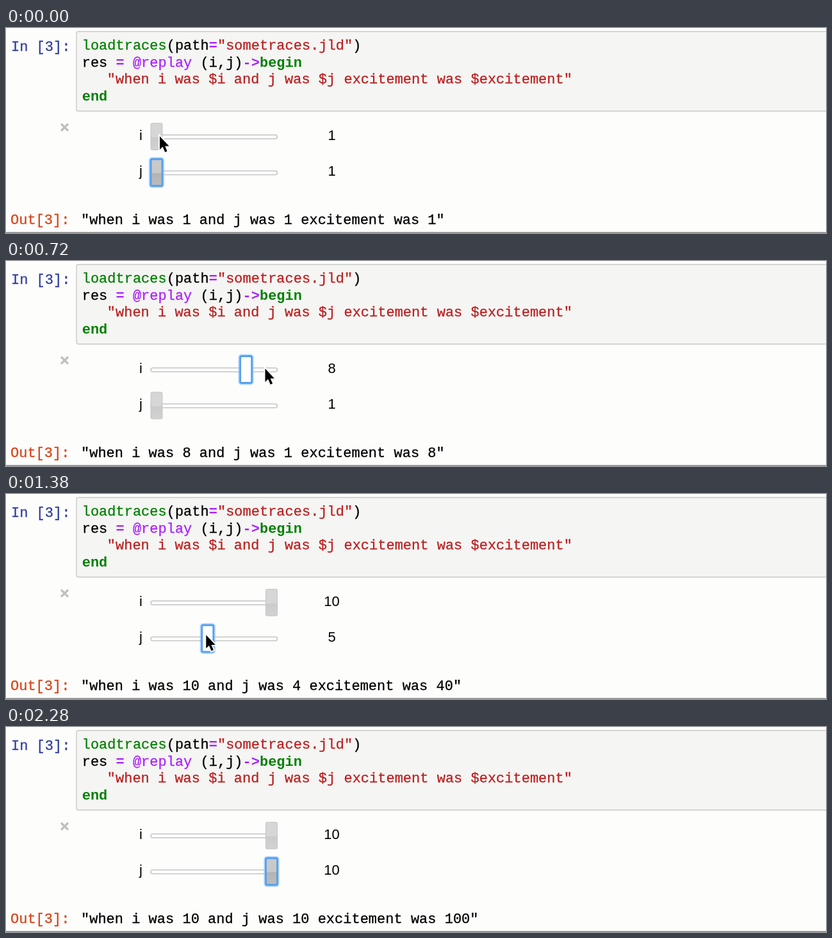
An HTML page that plays this animation: 1280x322 px, repeating every 2.31 s.

```html
<!DOCTYPE html>
<html lang="en">
<head>
<meta charset="utf-8">
<title>Slider replay</title>
<style>
  html, body { margin: 0; width: 100%; height: 100%; overflow: hidden; background: #fdfdfc; }
  svg { display: block; }
  text { white-space: pre; }
  .code { font: 22px "Liberation Mono", "Courier New", monospace; fill: #000; stroke: #000; stroke-width: .3; }
  .label { font: 22px "Liberation Sans", Arial, sans-serif; }
  .in { fill: #303f9f; stroke: #303f9f; }
  .out { fill: #d84315; stroke: #d84315; }
  .name, .key { fill: #008000; stroke: #008000; }
  .op, .macro { fill: #a2f; stroke: #a2f; }
  .str { fill: #ba2121; stroke: #ba2121; }
  .key, .op { font-weight: bold; stroke-width: 0; }
  .track { fill: #fff; stroke: #c4c4c4; stroke-width: 1.5; }
  .glow { fill: none; stroke: #8cc4fa; stroke-opacity: .6; stroke-width: 6.5; }
</style>
</head>
<body>
<svg width="1280" height="322" viewBox="0 0 1280 322">
  <defs>
    <linearGradient id="idle" x2="0" y2="1">
      <stop stop-color="#d6d6d6"/><stop offset=".53" stop-color="#d6d6d6"/>
      <stop offset=".53" stop-color="#cbcbcb"/><stop offset="1" stop-color="#d2d2d2"/>
    </linearGradient>
    <linearGradient id="focus" x2="0" y2="1">
      <stop stop-color="#cacaca"/><stop offset=".53" stop-color="#c8c8c8"/>
      <stop offset=".53" stop-color="#b4b4b4"/><stop offset="1" stop-color="#bcbcbc"/>
    </linearGradient>
  </defs>
  <rect x="110" y="5.5" width="1200" height="125" rx="3" fill="#f5f5f3" stroke="#c8c8c6" stroke-width="1.3"/>
  <g class="code">
    <text x="8" y="36" class="in">In [3]:</text>
    <text x="118.7" y="34"><tspan class="name">loadtraces</tspan>(path<tspan class="op">=</tspan><tspan class="str">"sometraces.jld"</tspan>)</text>
    <text x="118.7" y="61">res <tspan class="op">=</tspan> <tspan class="macro">@replay</tspan> (i,j)<tspan class="op">-&gt;</tspan><tspan class="key">begin</tspan></text>
    <text x="157.8" y="87" class="str">"when i was $i and j was $j excitement was $excitement"</text>
    <text x="118.7" y="114" class="key">end</text>
    <text x="7" y="308" class="out">Out[3]:</text>
    <text x="117" y="308" id="out"></text>
  </g>
  <path d="M86 150.5l11 11m0-11l-11 11" stroke="#bfbfbf" stroke-width="3.2"/>
  <g id="sliders"></g>
  <path d="M0 321.2H1280" stroke="#858585" stroke-width="1.6"/>
  <path id="arrow" d="M1 2V23L5.6 18.6L9.2 27L12.6 25.5L9.2 17.4H15.5Z" stroke="#fff" stroke-width="3.6" paint-order="stroke"/>
  <g id="beam" fill="none" stroke-linecap="round">
    <path d="M-5-12Q0-12 0-8Q0-12 5-12M0-8V9M-5 13Q0 13 0 9Q0 13 5 13M-3 2H3" stroke="#fff" stroke-width="4"/>
    <path d="M-5-12Q0-12 0-8Q0-12 5-12M0-8V9M-5 13Q0 13 0 9Q0 13 5 13M-3 2H3" stroke="#111" stroke-width="2"/>
  </g>
</svg>
<script>
const LOOP = 2310, STEP = 19.95;
const $ = id => document.getElementById(id);

// Pointer path: time, x, y
const path = [
  [0, 239, 168], [120, 239, 168], [480, 346, 167], [540, 353, 167],
  [780, 420, 167], [900, 437, 168], [960, 430, 172], [1080, 232, 215],
  [1110, 232, 217], [1170, 245, 218], [1200, 250, 218], [1560, 372, 221],
  [1700, 409, 221], [1770, 411, 221], [LOOP, 412, 222]
];

function pointer(t) {
  const n = Math.max(1, path.findIndex(p => p[0] >= t));
  const [a, b] = [path[n - 1], path[n]];
  const k = (t - a[0]) / (b[0] - a[0]);
  return [a[1] + (b[1] - a[1]) * k, a[2] + (b[2] - a[2]) * k];
}

function dragged(t, from, to, grabX) {
  if (t < from) return 1;
  const x = pointer(Math.min(t, to))[0];
  return Math.max(1, Math.min(10, Math.round(1 + (x - grabX) / STEP)));
}

const valueI = t => dragged(t - 60, 120, 870, 239);
const valueJ = t => dragged(t, 1110, 1950, 234);

function slider(name, y, value, focused, active) {
  const x = 226 + (value - 1) * STEP;
  const box = `x="${x}" y="${y - 21}" width="18" height="42" rx="2"`;
  const fill = active ? "#fff" : focused ? "url(#focus)" : "url(#idle)";
  const line = focused ? 'stroke="#559fec" stroke-width="2.8"' : 'stroke="#c6c6c6"';
  return `<text class="label" x="213" y="${y + 5.2}" text-anchor="end">${name}</text>
    <rect class="track" x="226" y="${y - 2.5}" width="197.5" height="6" rx="3"/>
    ${focused ? `<rect class="glow" ${box}/>` : ""}
    <rect ${box} fill="${fill}" ${line}/>
    <text class="label" x="508.5" y="${y + 5.2}" text-anchor="middle">${value}</text>`;
}

function place(el, x, y, shown) {
  el.setAttribute("transform", `translate(${x} ${y})`);
  el.style.display = shown ? "" : "none";
}

function draw(now) {
  const t = now % LOOP;
  const onI = t >= 120 && t < 1110;
  $("sliders").innerHTML =
    slider("i", 170.5, valueI(t), onI, onI && t < 870) +
    slider("j", 227, valueJ(t), !onI, t >= 1110 && t < 1950);

  // The printed result trails the sliders slightly.
  const i = valueI(t - 30), j = valueJ(t - 30);
  $("out").textContent = `"when i was ${i} and j was ${j} excitement was ${i * j}"`;

  const [x, y] = pointer(t), overText = x > 428, shown = t < 2100;
  place($("arrow"), x, y, shown && !overText);
  place($("beam"), x, y, shown && overText);
  requestAnimationFrame(draw);
}
requestAnimationFrame(draw);
</script>
</body>
</html>
```
